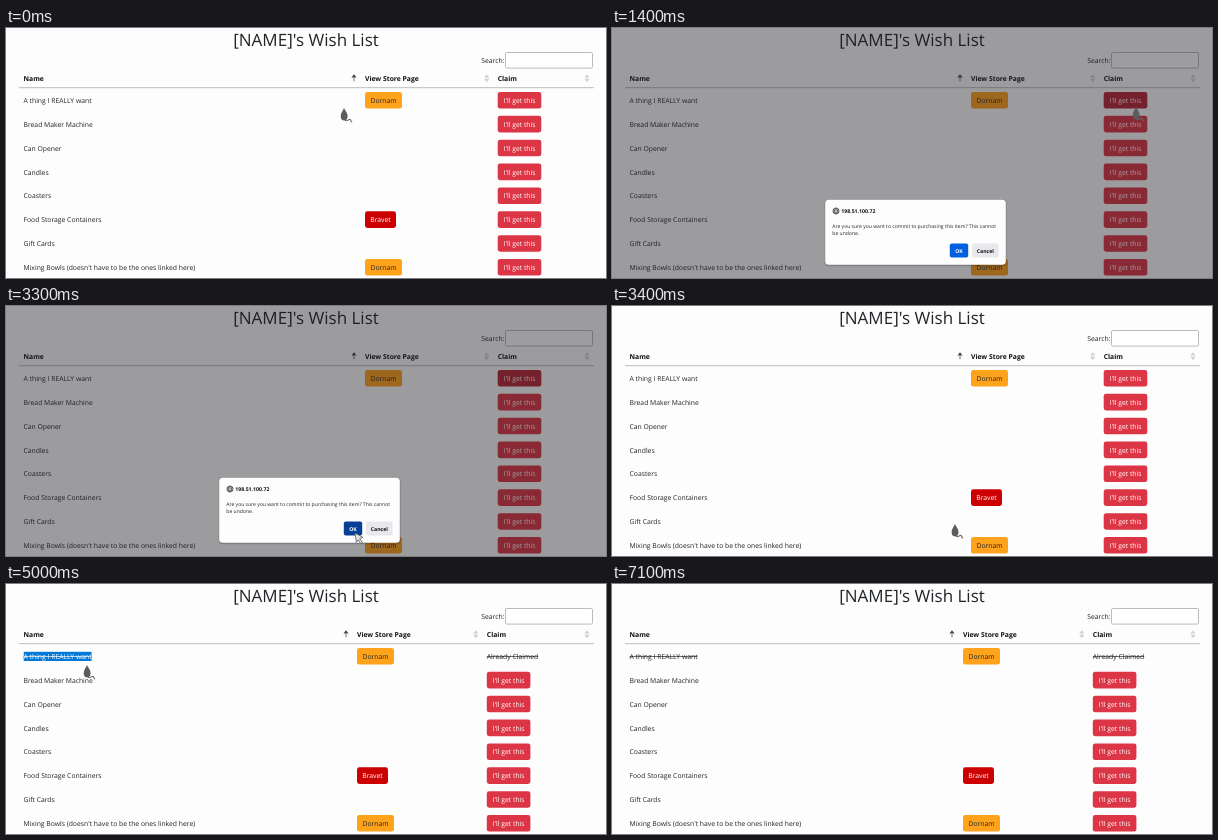
Write an HTML page that moves like this. It is 600 by 250 pixels and loops after 7.3 s.

```html
<!DOCTYPE html>
<html lang="en">
<head>
<meta charset="utf-8">
<title>Wish list</title>
<style>
  html, body { margin: 0; width: 100%; height: 100%; overflow: hidden; background: #fdfdfd; }
  svg { display: block; width: 100vw; height: 100vh; }
  text { font: 6.8px "Open Sans", "Noto Sans", sans-serif; fill: #212529; text-rendering: geometricPrecision; white-space: pre; }
  .title { font-size: 17px; text-anchor: middle; }
  .bold { font-weight: 700; fill: #111; }
  .light { fill: #fff; }
  .struck { text-decoration: line-through; }
  .small { font-size: 5.06px; }
  .small.bold { font-size: 5.2px; }
  .mid { text-anchor: middle; }
</style>
</head>
<body>
<svg id="stage" viewBox="0 0 600 250"></svg>
<script>
const LOOP = 7300, STEP = 100;
const RED = '#dc3545', RED_HOVER = '#c82333', RED_ACTIVE = '#b82536';
const stage = document.getElementById('stage');

function add(parent, tag, attrs = {}, content) {
  const node = document.createElementNS('http://www.w3.org/2000/svg', tag);
  for (const key in attrs) node.setAttribute(key, attrs[key]);
  if (content) node.textContent = content;
  return parent.appendChild(node);
}
const label = (parent, x, y, content, cls = '') =>
  add(parent, 'text', { x, y, class: cls }, content);
const box = (parent, x, y, width, height, fill, rx = 0) =>
  add(parent, 'rect', { x, y, width, height, fill, rx });
const show = (node, on) => { node.style.display = on ? '' : 'none'; };

const items = ['A thing I REALLY want', 'Bread Maker Machine', 'Can Opener', 'Candles', 'Coasters',
  'Food Storage Containers', 'Gift Cards', "Mixing Bowls (doesn't have to be the ones linked here)"];
const dornam = { name: 'Dornam', width: 37, fill: '#ffa21c', cls: '' };
const bravet = { name: 'Bravet', width: 31, fill: '#cc0000', cls: 'light' };
const stores = { 0: dornam, 5: bravet, 7: dornam };

function button(parent, x, y, width, fill, content, cls) {
  const face = box(parent, x, y - 8.4, width, 16.6, fill, 2.4);
  label(parent, x + width / 2, y + 2.6, content, 'mid ' + cls);
  return face;
}

function sortIcon(parent, x, active) {
  add(parent, 'path', { d: `M${x - 2.6} 49.6L${x} 46.2L${x + 2.6} 49.6Z`, fill: active ? '#444' : '#d0d0d0' });
  add(parent, 'path', active
    ? { d: `M${x - .7} 49.6h1.4v3.6h-1.4z`, fill: '#999' }
    : { d: `M${x - 2.6} 50.8L${x} 54.2L${x + 2.6} 50.8Z`, fill: '#d0d0d0' });
}

function table(storeX, claimX, claimed) {
  const group = add(stage, 'g');
  let firstButton;
  label(group, 17.5, 53, 'Name', 'bold');
  label(group, storeX, 53, 'View Store Page', 'bold');
  label(group, claimX, 53, 'Claim', 'bold');
  sortIcon(group, storeX - 11, true);
  sortIcon(group, claimX - 11, false);
  sortIcon(group, 581, false);
  items.forEach((item, row) => {
    const y = 72.4 + row * 23.86, struck = claimed && row === 0;
    const store = stores[row];
    label(group, 17.5, y + 2.6, item, struck ? 'struck' : '');
    if (store) button(group, storeX, y, store.width, store.fill, store.name, store.cls);
    if (struck) return label(group, claimX, y + 2.6, 'Already Claimed', 'struck');
    const face = button(group, claimX, y, 43.6, RED, "I'll get this", 'light');
    if (row === 0) firstButton = face;
  });
  return { group, firstButton };
}

function selection(id, x, content) {
  const clip = add(add(stage, 'clipPath', { id }), 'rect', { x, y: 67.6, height: 9.4, width: 0 });
  const group = add(stage, 'g', { 'clip-path': `url(#${id})` });
  box(group, x, 67.6, 100, 9.4, '#0078d7');
  const text = label(group, x, 75, content, 'light struck');
  return reach => {
    const length = text.getComputedTextLength();
    clip.setAttribute('width', Math.max(0, Math.min(length, reach - x)));
  };
}

// Page
label(stage, 300, 18, "[NAME]'s Wish List", 'title');
label(stage, 475.3, 35, 'Search:');
add(stage, 'rect', { x: 499.5, y: 24.5, width: 87, height: 15.6, rx: 1.4, fill: '#fff', stroke: '#b4b4b4', 'stroke-width': .9 });
box(stage, 13, 59.2, 575, 1, '#bcbcbc');
const before = table(359, 491.7, false);
const after = table(351, 480.8, true);
const selectItem = selection('pick-item', 17.5, items[0]);
const selectClaim = selection('pick-claim', 480.8, 'Already Claimed');

// Confirmation dialog
const dialog = add(stage, 'g');
box(dialog, 0, 0, 600, 250, 'rgba(28,27,34,.43)');
box(dialog, 212.6, 171.4, 182, 66.8, 'rgba(0,0,0,.18)', 4);
box(dialog, 213.2, 171.8, 180.6, 65, '#fdfdfd', 3.6);
add(dialog, 'path', {
  d: 'M220.9 183a3.1 3.1 0 1 0 6.2 0a3.1 3.1 0 1 0 -6.2 0zM221 182h6M221 184.2h6M224 180c-2 2-2 4 0 6c2-2 2-4 0-6',
  fill: 'none', stroke: '#333', 'stroke-width': .7
});
label(dialog, 229.3, 184.9, '198.51.100.72', 'small bold');
label(dialog, 220.3, 200.2, 'Are you sure you want to commit to purchasing this item? This cannot', 'small');
label(dialog, 220.3, 207, 'be undone.', 'small');
const okFace = box(dialog, 337.8, 215.6, 18.4, 14, '#0060df', 2);
label(dialog, 347, 224.5, 'OK', 'small bold mid light').style.fill = '#fff';
box(dialog, 360, 215.6, 26.6, 14, '#e9e9ed', 2);
label(dialog, 373.3, 224.5, 'Cancel', 'small bold mid');

// Pointer shapes share the tip as their origin
const pointer = add(stage, 'g');
const shapes = { drop: add(pointer, 'g'), hand: add(pointer, 'g'), arrow: add(pointer, 'g') };
add(shapes.drop, 'path', { d: 'M0 0C1 2.6 3.6 4.6 3.6 8.2C3.6 11.2 2 12.4 .2 12.4C-1.8 12.4 -3.3 11 -3.3 8.2C-3.3 4.6 -.8 2.6 0 0Z', fill: '#5c5c5e' });
add(shapes.drop, 'path', { d: 'M1 12C3.4 14.6 4 10.6 6 11.6C7.4 12.3 6.4 13.6 8.2 14.2', fill: 'none', stroke: '#666', 'stroke-width': 1.1 });
add(shapes.hand, 'ellipse', { cx: .2, cy: 4.3, rx: 3.2, ry: 4.5, fill: '#646467' });
add(shapes.arrow, 'path', { d: 'M0 0L8 4.4L4.6 5.6L7.6 9.6L6 10.8L3.2 6.8L1.4 9.4Z', fill: '#e8e8e8', stroke: '#555', 'stroke-width': .8 });

const path = [
  [0, 338, 80], [800, 526, 77], [1000, 526, 77], [1300, 524, 79], [1400, 524, 79],
  [1800, 384, 75], [2200, 324, 216], [2500, 349, 227], [3300, 349, 227], [3700, 310, 169],
  [4200, 14, 79], [4700, 93, 80], [4800, 91, 80], [4900, 91, 80], [5000, 81, 81],
  [5500, 481, 76], [6100, 535, 75], [6400, 535, 75], [6700, 592, 75], [LOOP, 592, 75]
];

function pointerAt(t) {
  const i = path.findIndex(p => p[0] > t);
  const [t0, x0, y0] = path[i - 1], [t1, x1, y1] = path[i];
  const u = (t - t0) / (t1 - t0), k = u * u * (3 - 2 * u);
  return [x0 + (x1 - x0) * k, y0 + (y1 - y0) * k];
}

function draw(t) {
  const [x, y] = pointerAt(t);
  const asking = t >= 1400 && t < 3400, reloaded = t >= 3600;
  const hovering = t < 1400 && x > 492;
  const kind = hovering ? 'hand' : t >= 2100 && t < 3400 ? 'arrow' : 'drop';

  show(before.group, !reloaded);
  show(after.group, reloaded);
  show(dialog, asking);
  before.firstButton.setAttribute('fill',
    t >= 1300 && t < 3400 ? RED_ACTIVE : hovering ? RED_HOVER : RED);
  okFace.setAttribute('fill', t >= 3200 ? '#054096' : t >= 2400 ? '#0250bb' : '#0060df');

  selectItem(t < 4200 || t >= 5500 ? 0 : t < 4700 ? x : 100);
  selectClaim(t >= 5500 && t < 6500 ? x : 0);

  show(pointer, t < 6700);
  pointer.setAttribute('transform', `translate(${x} ${y})`);
  for (const name in shapes) show(shapes[name], name === kind);
}

const start = performance.now();
function tick() {
  const t = (performance.now() - start) % LOOP;
  draw(Math.floor(t / STEP) * STEP);
  requestAnimationFrame(tick);
}
tick();
</script>
</body>
</html>
```
